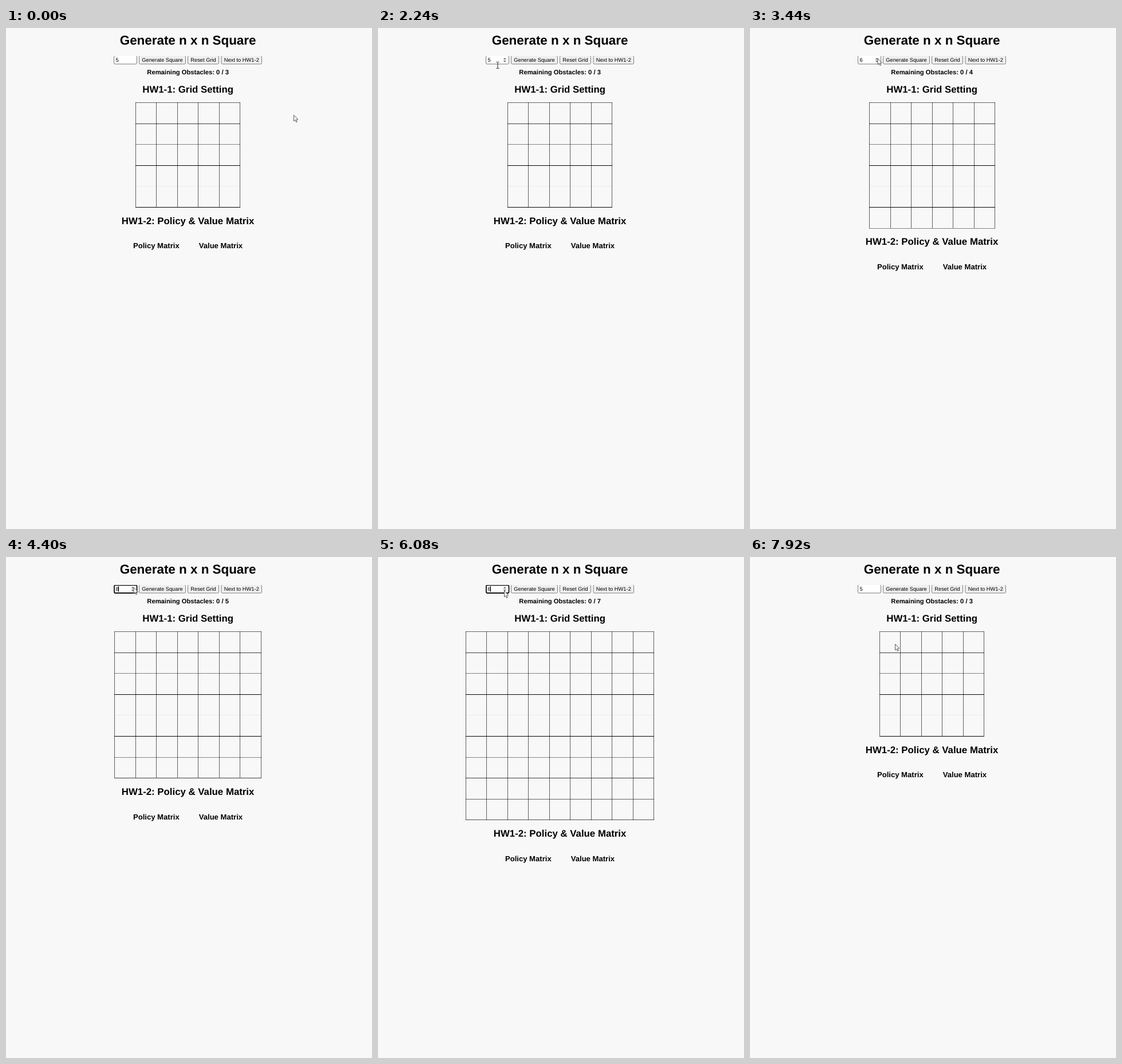
These frames come from a looping animation (639x876 px, 8 s). An HTML page with a canvas:

```html
<!DOCTYPE html>
<html lang="en">
<head>
<meta charset="utf-8">
<title>Generate n x n Square</title>
<style>
  html, body { margin: 0; height: 100%; overflow: hidden; background: #f8f8f8; }
  canvas { display: block; }
</style>
</head>
<body>
<canvas id="stage" width="639" height="876"></canvas>
<script>
const ctx = document.getElementById('stage').getContext('2d');
const LOOP = 8000, STEP = 80;
const MID = 317.6, ZOOM = .7, COL = 36.5, ROW = 36.57;
const FONT = '"Liberation Sans", Arial, sans-serif';

// Four equal rounds: step the number up, then press Generate half a round later
const ROUND = 800, FIRST = 2720, ROUNDS = 4, REGENERATE = 6960;
const stepDowns = [5840, 6000, 6080, 6240];

// Pointer moves: start time, end time, x, y
const moves = [
  [640, 1440, 467, 126],
  [1440, 2160, 209, 65],
  [2320, 2640, 222.5, 53],
  [5600, 5840, 220, 59],
  [6240, 6720, 263, 58],
  [7040, 7840, 253, 152]
];

const clamp = (v, lo = 0, hi = 1) => Math.min(hi, Math.max(lo, v));

function ease(t, start, end) {
  const k = clamp((t - start) / (end - start));
  return k * k * (3 - 2 * k);
}

const roundsBegun = t => clamp(Math.floor((t - FIRST) / ROUND) + 1, 0, ROUNDS);

function valueAt(t) {
  return 5 + roundsBegun(t) - stepDowns.filter(d => d <= t).length;
}

function sizeAt(t) {
  return t < REGENERATE ? 5 + roundsBegun(t - ROUND / 2) : 5;
}

function pointer(t) {
  let x = 502, y = 152;
  for (const [start, end, toX, toY] of moves) {
    const k = ease(t, start, end);
    x += (toX - x) * k;
    y += (toY - y) * k;
  }
  const turns = clamp((t - FIRST) / ROUND, 0, ROUNDS);
  const sway = clamp(.5 - .8 * Math.cos(turns * 2 * Math.PI));
  return [x + 40 * sway, y + 4 * sway];
}

// Sizes are in page pixels before zooming
function text(str, x, y, size, weight = 'bold', align = 'center') {
  ctx.save();
  ctx.translate(x, y);
  ctx.scale(ZOOM, ZOOM);
  ctx.font = `${weight} ${size}px ${FONT}`;
  ctx.textRendering = 'geometricPrecision';
  ctx.textAlign = align;
  ctx.fillStyle = '#000';
  ctx.fillText(str, 0, 0);
  ctx.restore();
}

function rect(color, x, y, w, h) {
  ctx.fillStyle = color;
  ctx.fillRect(x, y, w, h);
}

function box(x, y, w, h, fill, stroke, width = 1) {
  ctx.beginPath();
  ctx.roundRect(x, y, w, h, 2);
  ctx.fillStyle = fill;
  ctx.fill();
  ctx.strokeStyle = stroke;
  ctx.lineWidth = width;
  ctx.stroke();
}

function poly(points, fill, stroke = fill, width = 0.1) {
  ctx.beginPath();
  points.forEach(([x, y]) => ctx.lineTo(x, y));
  ctx.closePath();
  ctx.fillStyle = fill;
  ctx.fill();
  ctx.strokeStyle = stroke;
  ctx.lineWidth = width;
  ctx.stroke();
}

function drawField(value, focused, hovered) {
  if (focused) box(189, 49.3, 39.5, 13.7, '#fff', '#111', 1.8);
  else box(188.5, 48.5, 40, 14.5, '#fff', '#777');
  text(value, 191.5, 59.3, 13.33, 'normal', 'left');
  if (focused) rect('#000', 196, 51, 1, 10);
  if (!focused && !hovered) return;
  for (const side of [-1, 1])
    poly([[218.8, 56 + side], [221.3, 56 + side * 4], [223.8, 56 + side]], '#777');
}

function drawButton(x, w, label) {
  box(x + .5, 48.5, w - 1, 14.5, '#efefef', '#808080');
  text(label, x + w / 2, 59.3, 13.33, 'normal');
}

function drawControls(value, focused, px, py) {
  ctx.save();
  ctx.beginPath();
  ctx.rect(0, 49, 639, 20);   // the page crops the top edge of this row
  ctx.clip();
  drawField(value, focused, py < 67 && px > 188 && px < 229);
  drawButton(232, 82, 'Generate Square');
  drawButton(317, 55, 'Reset Grid');
  drawButton(375.5, 71.5, 'Next to HW1-2');
  ctx.restore();
}

function drawGrid(n) {
  const left = 317.5 + (n % 2 ? 0 : .5) - n * COL / 2;
  const x0 = Math.floor(left), side = Math.floor(left + n * COL) - x0 + 1;
  for (let i = 0; i <= n; i++) {
    // Zooming leaves row lines alternately strong and weak around the fifth
    const d = Math.abs(i - 4);
    const ink = .65 - .6 * (-1) ** d * Math.exp(-.6 * d);
    rect(`rgba(0,0,0,${ink})`, x0, Math.floor(130.6 + i * ROW), side, 1);
    rect('rgba(0,0,0,.62)', Math.floor(left + i * COL), 130, 1, Math.floor(n * ROW) + 1);
  }
}

function drawPointer(x, y) {
  if (x > 188 && x < 217 && y < 67) {
    rect('#222', x - .5, y - 5, 1, 11);
    for (const dy of [-6, 5])
      for (const dx of [-2.5, .5]) rect('#222', x + dx, y + dy, 2, 1);
    return;
  }
  const arrow = [[0, 0], [0, 10.5], [2.4, 8.4], [4.1, 12.3], [5.8, 11.5], [4.2, 7.8], [7.3, 7.5]];
  poly(arrow.map(([a, b]) => [x + a + .5, y + b + .3]), '#fff', '#555', 1);
}

function draw(t) {
  const value = valueAt(t), n = sizeAt(t), [px, py] = pointer(t);
  const shift = (n - 5) * ROW;

  rect('#f8f8f8', 0, 0, 639, 876);
  text('Generate n x n Square', MID, 28.7, 32);
  drawControls(value, value !== n, px, py);
  text(`Remaining Obstacles: 0 / ${n - 2}`, MID, 80.5, 16);
  text('HW1-1: Grid Setting', MID, 112.8, 24);
  drawGrid(n);
  text('HW1-2: Policy & Value Matrix', MID, 342.8 + shift, 24);
  text('Policy Matrix', 262.3, 385.4 + shift, 18.72);
  text('Value Matrix', 374.9, 385.4 + shift, 18.72);
  drawPointer(px, py);
}

function tick(now) {
  draw(Math.floor(now % LOOP / STEP) * STEP);
  requestAnimationFrame(tick);
}
requestAnimationFrame(tick);
</script>
</body>
</html>
```
